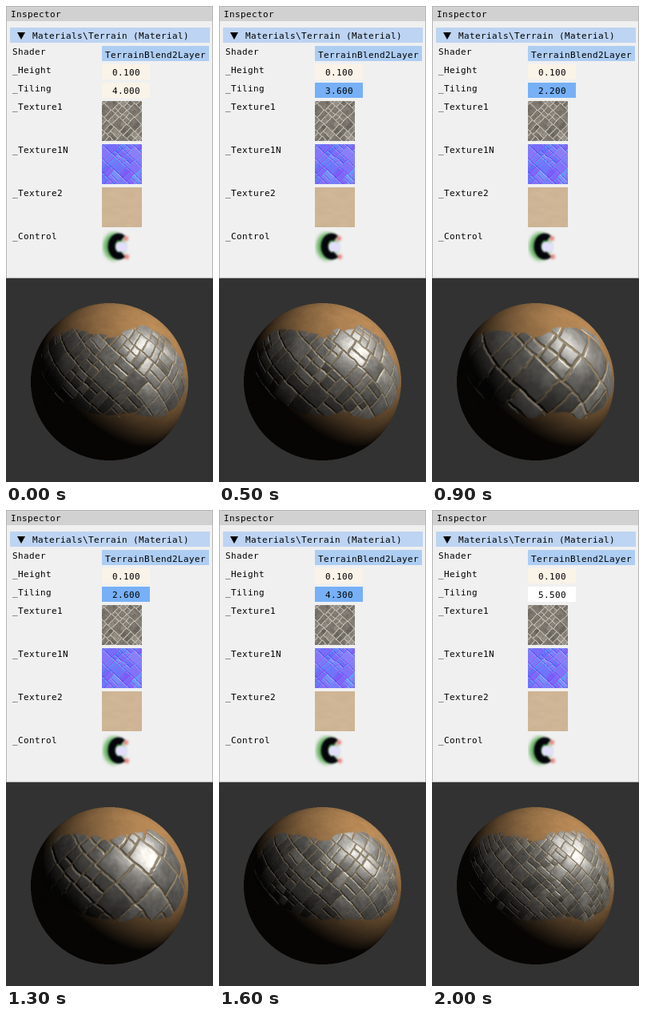
Recreate the animation shown at these times as an HTML page with a canvas. Size 259 px wide and 596 px high, loop 2500 ms.

```html
<!DOCTYPE html>
<html lang="en">
<head>
<meta charset="utf-8">
<title>Material inspector</title>
<style>
  html, body { margin: 0; width: 259px; height: 596px; overflow: hidden; background: #323232; }
  svg, canvas { position: absolute; left: 0; top: 0; display: block; }
  text { font: 11px "DejaVu Sans Mono", "Liberation Mono", monospace; letter-spacing: .38px; fill: #000; white-space: pre; }
</style>
</head>
<body>
<svg width="259" height="596" shape-rendering="crispEdges">
  <rect width="259" height="596" fill="#323232"/>
  <rect width="259" height="341" fill="#b4b4b4"/>
  <rect x="1" y="1" width="257" height="18" fill="#d1d1d1"/>
  <rect x="1" y="19" width="257" height="321" fill="#f0f0f0"/>
  <rect x="5" y="27" width="250" height="19" fill="#bdd4f2"/>
  <path d="M14 33H24L19 42Z" shape-rendering="auto"/>
  <rect x="120" y="50" width="134" height="19" fill="#aecdf3"/>
  <rect x="120" y="73" width="60" height="19" fill="#faf3e8"/>
  <rect id="field" x="120" y="96" width="60" height="19" fill="#faf3e8"/>
  <text x="6" y="14">Inspector</text>
  <text x="33" y="41">Materials\Terrain (Material)</text>
  <text x="8" y="61">Shader</text>
  <text x="124" y="65">TerrainBlend2Layer</text>
  <text x="8" y="84">_Height</text>
  <text x="133" y="87">0.100</text>
  <text x="8" y="107">_Tiling</text>
  <text x="133" y="110" id="value">4.000</text>
  <text x="8" y="130">_Texture1</text>
  <text x="8" y="184">_Texture1N</text>
  <text x="8" y="238">_Texture2</text>
  <text x="8" y="292">_Control</text>
</svg>
<canvas id="view" width="259" height="596"></canvas>
<script>
const ctx = document.getElementById('view').getContext('2d');
const field = document.getElementById('field');
const value = document.getElementById('value');

const LOOP = 2500;
const CREAM = '#faf3e8', HOVER = '#ffffff', ACTIVE = '#77b0f6';
// start time, tiling, field colour
const STEPS = [
  [0, 4, CREAM], [200, 4, HOVER], [400, 4, ACTIVE], [500, 3.6, ACTIVE],
  [600, 3.2, ACTIVE], [700, 2.8, ACTIVE], [800, 2.5, ACTIVE], [900, 2.2, ACTIVE],
  [1000, 2.1, ACTIVE], [1300, 2.6, ACTIVE], [1400, 3.1, ACTIVE], [1500, 3.7, ACTIVE],
  [1600, 4.3, ACTIVE], [1700, 4.8, ACTIVE], [1800, 5.2, ACTIVE], [1900, 5.5, ACTIVE],
  [2000, 5.5, HOVER]
];

const clamp = (x, a = 0, b = 1) => Math.min(b, Math.max(a, x));
const mod = (a, n) => ((a % n) + n) % n;
const mix = (a, b, t) => a + (b - a) * t;
const smooth = (a, b, x) => { const t = clamp((x - a) / (b - a)); return t * t * (3 - 2 * t); };
const dot = (a, b) => a[0] * b[0] + a[1] * b[1] + a[2] * b[2];

function rand(i, j, seed) {
  const s = Math.sin(i * 127.1 + j * 311.7 + seed * 74.7) * 43758.5453;
  return s - Math.floor(s);
}

function noise(x, y, period, seed) {
  const i = Math.floor(x), j = Math.floor(y);
  const tx = smooth(0, 1, x - i), ty = smooth(0, 1, y - j);
  const at = (a, b) => rand(mod(i + a, period), mod(j + b, period), seed);
  return mix(mix(at(0, 0), at(1, 0), tx), mix(at(0, 1), at(1, 1), tx), ty);
}

// Repeating paving texture: CELLS x CELLS blocks, some split into smaller stones
const SIZE = 512, CELLS = 8, DENSITY = SIZE / CELLS;
const layer = () => new Float32Array(SIZE * SIZE);
const height = layer(), tint = layer(), grain = layer(), slopeP = layer(), slopeQ = layer();

function texel(p, q) {
  return (Math.floor(q * DENSITY) & (SIZE - 1)) * SIZE + (Math.floor(p * DENSITY) & (SIZE - 1));
}

function cut(f, on, at) {
  if (!on) return [Math.min(f, 1 - f), 0];
  return f < at ? [Math.min(f, at - f), 0] : [Math.min(f - at, 1 - f), 1];
}

function bake() {
  for (let y = 0; y < SIZE; y++) for (let x = 0; x < SIZE; x++) {
    const p = x / DENSITY, q = y / DENSITY, k = y * SIZE + x;
    const warp = seed => 0.05 * (noise(p * 3, q * 3, 24, seed) - 0.5) + 0.03 * (noise(p * 8, q * 8, 64, seed) - 0.5);
    const b = q + warp(2);
    const i = Math.floor(b), row = mod(i, CELLS);
    const a = p + warp(1) + rand(row, 0, 9);
    const j = Math.floor(a), col = mod(j, CELLS);
    const kind = rand(col, row, 3);
    const [dx, sx] = cut(a - j, kind > 0.5 && kind < 0.65 || kind > 0.82, 0.38 + 0.24 * rand(col, row, 4));
    const [dy, sy] = cut(b - i, kind > 0.65, 0.38 + 0.24 * rand(col, row, 5));
    grain[k] = 0.6 * noise(p * 3, q * 3, 24, 6) + 0.4 * noise(p * 9, q * 9, 72, 7);
    tint[k] = rand(col + sx * 0.37, row + sy * 0.61, 8);
    height[k] = smooth(0.01, 0.06, Math.min(dx, dy)) * (0.8 + 0.2 * tint[k]) + 0.16 * (grain[k] - 0.5);
  }
  const STEP = 2, BUMP = 0.026;
  for (let y = 0; y < SIZE; y++) for (let x = 0; x < SIZE; x++) {
    const k = y * SIZE + x;
    const at = (dx, dy) => height[((y + dy) & (SIZE - 1)) * SIZE + ((x + dx) & (SIZE - 1))];
    const scale = BUMP * DENSITY / (2 * STEP);
    slopeP[k] = (at(STEP, 0) - at(-STEP, 0)) * scale + (tint[k] - 0.5) * 0.2;
    slopeQ[k] = (at(0, STEP) - at(0, -STEP)) * scale + (tint[k] * 7 % 1 - 0.5) * 0.2;
  }
}

// Paving runs diagonally across the texture
const COS = Math.cos(0.75), SIN = Math.sin(0.75);
const lookup = (u, v) => texel(u * COS + v * SIN, v * COS - u * SIN);
const slope = k => [slopeP[k] * COS - slopeQ[k] * SIN, slopeP[k] * SIN + slopeQ[k] * COS];

// Runs a shader over a w x h area, averaging 2 x 2 samples per pixel
function paint(w, h, shade) {
  const img = new ImageData(w, h);
  for (let y = 0; y < h; y++) for (let x = 0; x < w; x++) {
    let r = 0, g = 0, b = 0, n = 0;
    for (let s = 0; s < 4; s++) {
      const c = shade(x + 0.25 + (s & 1) / 2, y + 0.25 + (s >> 1) / 2);
      if (!c) continue;
      r += clamp(c[0], 0, 255); g += clamp(c[1], 0, 255); b += clamp(c[2], 0, 255); n++;
    }
    if (n) img.data.set([r / n, g / n, b / n, n * 63.75], (y * w + x) * 4);
  }
  return img;
}

// Swatches
const SCALE = 13;
const paving = (x, y) => lookup(x / SCALE, y / SCALE);

function stoneSwatch(x, y) {
  const k = paving(x, y), t = smooth(0.1, 0.7, height[k]);
  const s = (0.85 + 0.25 * tint[k]) * (0.8 + 0.4 * grain[k]);
  return [mix(205, 131 * s, t), mix(200, 125 * s, t), mix(188, 116 * s, t)];
}

function normalSwatch(x, y) {
  const k = paving(x, y), [gu, gv] = slope(k);
  return [120 - gu * 190, 120 + gv * 190, 250 - 20 * Math.hypot(gu, gv)];
}

function sandSwatch(x, y) {
  const s = 0.985 + 0.03 * noise(x / 9, y / 4, 64, 12);
  return [206 * s, 181 * s, 149 * s];
}

function blob(blur, color, x, y, rx, ry) {
  ctx.filter = `blur(${blur}px)`;
  ctx.fillStyle = color;
  ctx.beginPath();
  ctx.ellipse(x, y, rx, ry, 0, 0, 7);
  ctx.fill();
}

function drawControl() {
  ctx.save();
  ctx.beginPath();
  ctx.rect(120, 281, 50, 50);
  ctx.clip();
  blob(2.5, 'rgba(80,165,75,.9)', 135, 301, 13, 17);
  blob(1.5, 'rgba(225,85,75,.7)', 150, 291, 3, 3);
  blob(1.5, 'rgba(225,85,75,.7)', 151, 314, 3, 3);
  blob(1.2, '#e2dffa', 144, 302, 8, 7);
  ctx.filter = 'blur(1.2px)';
  ctx.strokeStyle = '#05050c';
  ctx.lineWidth = 9;
  ctx.beginPath();
  ctx.ellipse(141, 301, 9, 12, 0, 0.95, 5.3);
  ctx.stroke();
  ctx.restore();
}

// Sphere
const R = 98.5, LEFT = 31, TOP = 372, BOX = 197;
const LIGHT = [0.61, -0.64, 0.47], GLOSS = [0.45, -0.44, 0.777];
const EDGE = [
  [46, 436], [62, 411], [80, 405], [104, 409], [134, 415], [152, 404], [181, 402], [204, 416],
  [220, 446], [225, 478], [214, 503], [190, 515], [165, 509], [130, 514], [104, 511], [82, 497], [58, 489], [43, 466]
];
let mask;

// Soft region of the sphere that carries stone
function makeMask() {
  const c = document.createElement('canvas');
  c.width = c.height = BOX;
  const g = c.getContext('2d');
  g.filter = 'blur(5px)';
  g.translate(-LEFT, -TOP);
  g.beginPath();
  EDGE.forEach(p => g.lineTo(...p));
  g.fill();
  mask = g.getImageData(0, 0, BOX, BOX).data;
}

function sphere(tiling) {
  const zoom = tiling / 96;
  return paint(BOX, BOX, (x, y) => {
    const nx = x / R - 1, ny = y / R - 1, rr = nx * nx + ny * ny;
    if (rr >= 1) return null;
    const nz = Math.sqrt(1 - rr);
    const lon = Math.atan2(nx, nz), lat = Math.asin(ny);
    const u = (lon * R + 310) * zoom, v = (lat * R - 155) * zoom;
    const k = lookup(u, v);
    const m = mask[((y | 0) * BOX + (x | 0)) * 4 + 3] / 255;
    const w = smooth(0, 0.22, m + height[k] * 0.45 + (tint[k] - 0.5) * 0.3 - 0.72);

    const [gu, gv] = slope(k);
    const sl = Math.sin(lon), cl = Math.cos(lon), cosLat = Math.cos(lat);
    let n = [
      nx - w * (gu * cl - gv * ny * sl),
      ny - w * gv * cosLat,
      nz + w * (gu * sl + gv * ny * cl)
    ];
    const len = Math.hypot(...n);
    n = n.map(c => c / len);

    const lit = 0.035 + 1.02 * Math.max(0, (dot(n, LIGHT) + 0.1) / 1.1);
    const t = smooth(0.1, 0.65, height[k]);
    const s = (0.85 + 0.25 * tint[k]) * (0.82 + 0.36 * grain[k]);
    const ripple = 0.95 + 0.1 * grain[texel(u * 0.5 + v * 0.2, v * 0.9 - u * 0.15)];
    const shine = Math.pow(Math.max(0, dot(n, GLOSS)), 26) * w * t * 125;
    const stone = [mix(160, 128 * s, t), mix(143, 125 * s, t), mix(112, 119 * s, t)];
    const sand = [177 * ripple, 132 * ripple, 83 * ripple];
    return sand.map((c, i) => mix(c, stone[i], w) * lit + shine);
  });
}

const cache = {};
let shown = -1;

function frame(now) {
  const t = now % LOOP;
  const i = STEPS.findLastIndex(s => s[0] <= t);
  if (i !== shown) {
    const [, tiling, color] = STEPS[shown = i];
    field.setAttribute('fill', color);
    value.textContent = tiling.toFixed(3);
    cache[tiling] ??= sphere(tiling);
    ctx.putImageData(cache[tiling], LEFT, TOP);
  }
  requestAnimationFrame(frame);
}

bake();
makeMask();
ctx.putImageData(paint(50, 50, stoneSwatch), 120, 119);
ctx.putImageData(paint(50, 50, normalSwatch), 120, 173);
ctx.putImageData(paint(50, 50, sandSwatch), 120, 227);
drawControl();
frame(performance.now());
</script>
</body>
</html>
```
